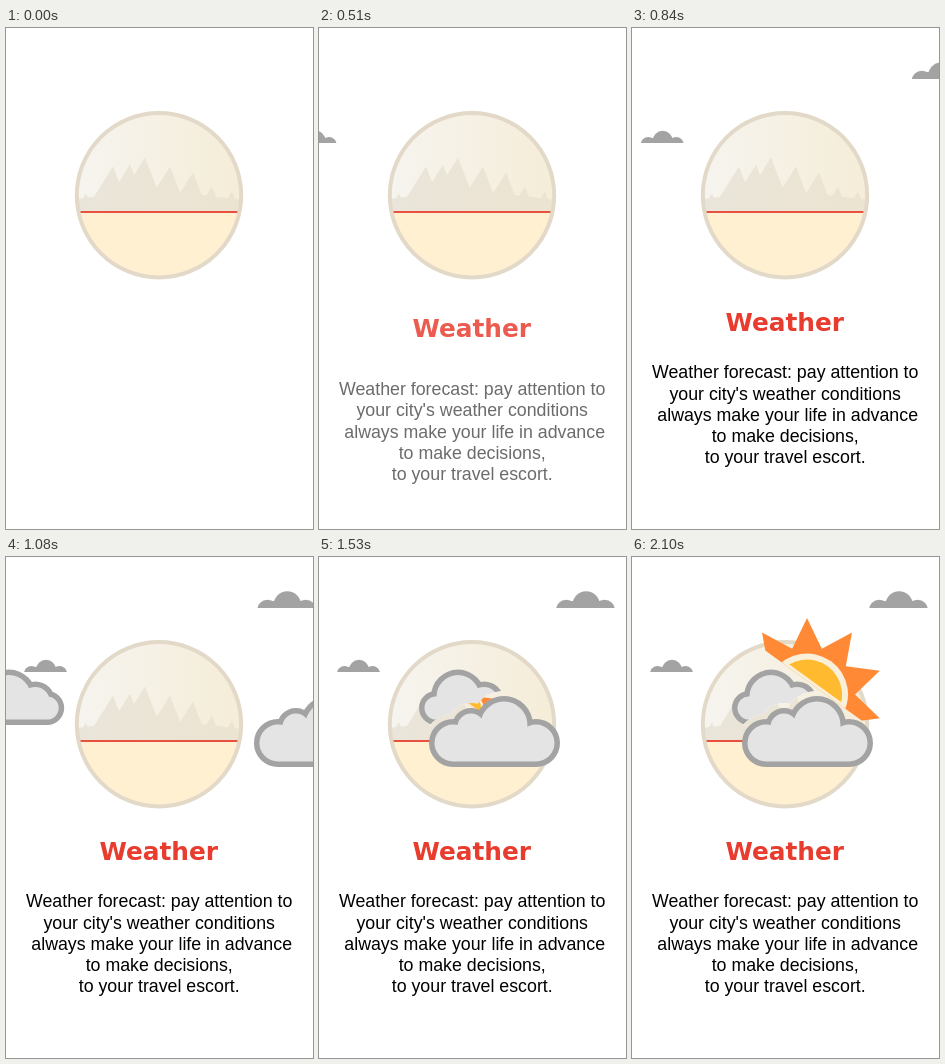
An HTML page with a canvas for the animation above (4770 ms loop, 307x501 px).

```html
<!DOCTYPE html>
<html lang="en">
<head>
<meta charset="utf-8">
<title>Weather</title>
<style>
  html, body { margin: 0; width: 100%; height: 100%; overflow: hidden; background: #fff; }
  canvas { display: block; width: 307px; height: 501px; }
</style>
</head>
<body>
<canvas id="stage"></canvas>
<script>
const W = 307, H = 501, LOOP = 4770, STEP = 30;
const GREY = '#a3a3a3', PALE = '#e4e4e4';
const HORIZON = 183.5;
const canvas = document.getElementById('stage');
const ctx = canvas.getContext('2d');
const ratio = window.devicePixelRatio || 1;
canvas.width = Math.round(W * ratio);
canvas.height = Math.round(H * ratio);

const LINES = [
  'Weather forecast: pay attention to',
  "your city's weather conditions",
  ' always make your life in advance',
  'to make decisions,',
  'to your travel escort.'
];

// Summits as [x, height]
const SUMMITS = [[80, 18], [107, 45], [124, 47], [139, 54], [164, 45], [187, 39], [206, 25], [226, 20]];

// Lobes as [x, y, radius] above a flat base
const REAR = { lobes: [[117, 151, 17], [139, 139.6, 27], [165, 144.5, 20], [177, 151, 17]], base: 168 };
const FRONT = { lobes: [[134, 186, 24], [152, 170, 19], [185, 168, 29], [217, 186, 24]], base: 210 };

const progress = (t, start, end) => Math.min(1, Math.max(0, (t - start) / (end - start)));

function circle(x, y, r, fill) {
  ctx.fillStyle = fill;
  ctx.beginPath();
  ctx.arc(x, y, r, 0, Math.PI * 2);
  ctx.fill();
}

function across(left, right) {
  const g = ctx.createLinearGradient(73, 0, 233, 0);
  g.addColorStop(0, left);
  g.addColorStop(1, right);
  return g;
}

// Each summit rises gently and falls steeply above the foothills
function ridge(x) {
  const foothill = 22 - Math.abs(x - 150) * 0.12;
  return Math.max(foothill, ...SUMMITS.map(([sx, h]) => h - (x < sx ? 1.6 * (sx - x) : 2.6 * (x - sx))));
}

function mountains() {
  ctx.fillStyle = across('#eae5da', '#ece4d1');
  ctx.beginPath();
  ctx.moveTo(69, HORIZON);
  for (let x = 69; x <= 237; x++) ctx.lineTo(x, HORIZON - ridge(x));
  ctx.lineTo(237, HORIZON);
  ctx.fill();
}

function landscape() {
  ctx.save();
  ctx.beginPath();
  ctx.arc(153, 167.3, 82, 0, Math.PI * 2);
  ctx.clip();
  ctx.fillStyle = across('#f6f4ef', '#f5edd8');
  ctx.fillRect(69, 83, 168, 101);
  mountains();
  ctx.fillStyle = '#fff0d1';
  ctx.fillRect(69, 184, 168, 68);
  ctx.fillStyle = '#e8503f';
  ctx.fillRect(69, 183, 168, 2);
  ctx.restore();
  ctx.strokeStyle = '#e3d9c8';
  ctx.lineWidth = 4;
  ctx.beginPath();
  ctx.arc(153, 167.3, 82.2, 0, Math.PI * 2);
  ctx.stroke();
}

// A tilted half sun that grows out of its lower left corner
function sun(scale) {
  ctx.save();
  ctx.translate(129, 162);
  ctx.scale(scale, scale);
  ctx.translate(46, -24.5);
  ctx.rotate(Math.PI / 5);
  ctx.beginPath();
  ctx.rect(-80, -80, 160, 69);
  ctx.clip();
  ctx.fillStyle = '#ff8934';
  ctx.beginPath();
  for (let i = 0; i <= 10; i++) {
    const r = i % 2 ? 76.5 : 48, a = Math.PI * (1 + i / 10);
    ctx.lineTo(r * Math.cos(a), r * Math.sin(a));
  }
  ctx.fill();
  circle(0, 0, 41, '#faf0d9');
  ctx.beginPath();
  ctx.rect(-80, -80, 160, 66);
  ctx.clip();
  circle(0, 0, 35, '#ffba2f');
  ctx.restore();
}

function backdrop(t) {
  ctx.fillStyle = '#fff';
  ctx.fillRect(0, 0, W, H);
  landscape();
  if (t >= 1500) sun(0.38 + 0.62 * progress(t, 1500, 2100));
}

// Cloud outline, moved by dx and grown or shrunk by d
function outline({ lobes, base }, dx, d) {
  const path = new Path2D();
  for (const [x, y, r] of lobes) {
    path.moveTo(x + dx + r + d, y);
    path.arc(x + dx, y, r + d, 0, Math.PI * 2);
  }
  const x0 = lobes[0][0], x1 = lobes[lobes.length - 1][0], top = lobes[0][1] - 10;
  path.rect(x0 + dx, top, x1 - x0, base + d - top);
  return path;
}

function bigCloud(cloud, dx) {
  ctx.fillStyle = GREY;
  ctx.fill(outline(cloud, dx, 0));
  ctx.fillStyle = PALE;
  ctx.fill(outline(cloud, dx, -5.5));
}

function bigClouds(t) {
  const away = 1 - progress(t, 900, 1500);
  const rearX = -194 * away, frontX = 197 * away;
  bigCloud(REAR, rearX);
  // The rear cloud is cut away around the front one
  ctx.save();
  ctx.clip(outline(REAR, rearX, 1));
  ctx.clip(outline(FRONT, frontX, 5));
  backdrop(t);
  ctx.restore();
  bigCloud(FRONT, frontX);
}

function smallCloud(x, y, scale) {
  ctx.save();
  ctx.translate(x, y);
  ctx.scale(scale, scale);
  ctx.beginPath();
  ctx.rect(0, -14, 44, 14);
  ctx.clip();
  circle(7.5, 1.5, 7.5, GREY);
  circle(22, -2.3, 10, GREY);
  circle(35.5, 1.5, 7.5, GREY);
  ctx.fillStyle = GREY;
  ctx.fillRect(7, -5, 28, 5);
  ctx.restore();
}

function texts(t) {
  ctx.textAlign = 'center';
  const title = progress(t, 30, 600);
  ctx.globalAlpha = title;
  ctx.fillStyle = '#e83c2e';
  ctx.font = 'bold 24.8px "DejaVu Sans", sans-serif';
  ctx.fillText('Weather', 152.7, Math.round(303 + 40 * (1 - title)));

  const body = progress(t, 180, 750);
  ctx.globalAlpha = body;
  ctx.fillStyle = '#000';
  ctx.font = '17.78px "Liberation Sans", Arial, sans-serif';
  LINES.forEach((line, i) => ctx.fillText(line, 153.2, Math.round(350.4 + 21.25 * i + 40 * (1 - body))));
  ctx.globalAlpha = 1;
}

function draw(t) {
  ctx.setTransform(ratio, 0, 0, ratio, 0, 0);
  backdrop(t);
  smallCloud(18 - 61 * (1 - progress(t, 340, 930)), 115, 1);
  smallCloud(237 + 71 * (1 - progress(t, 600, 1200)), 51, 1.37);
  bigClouds(t);
  texts(t);
}

const begin = performance.now();
function tick() {
  const t = (performance.now() - begin) % LOOP;
  draw(t < 60 ? 0 : Math.floor(t / STEP) * STEP);
  requestAnimationFrame(tick);
}
tick();
</script>
</body>
</html>
```
